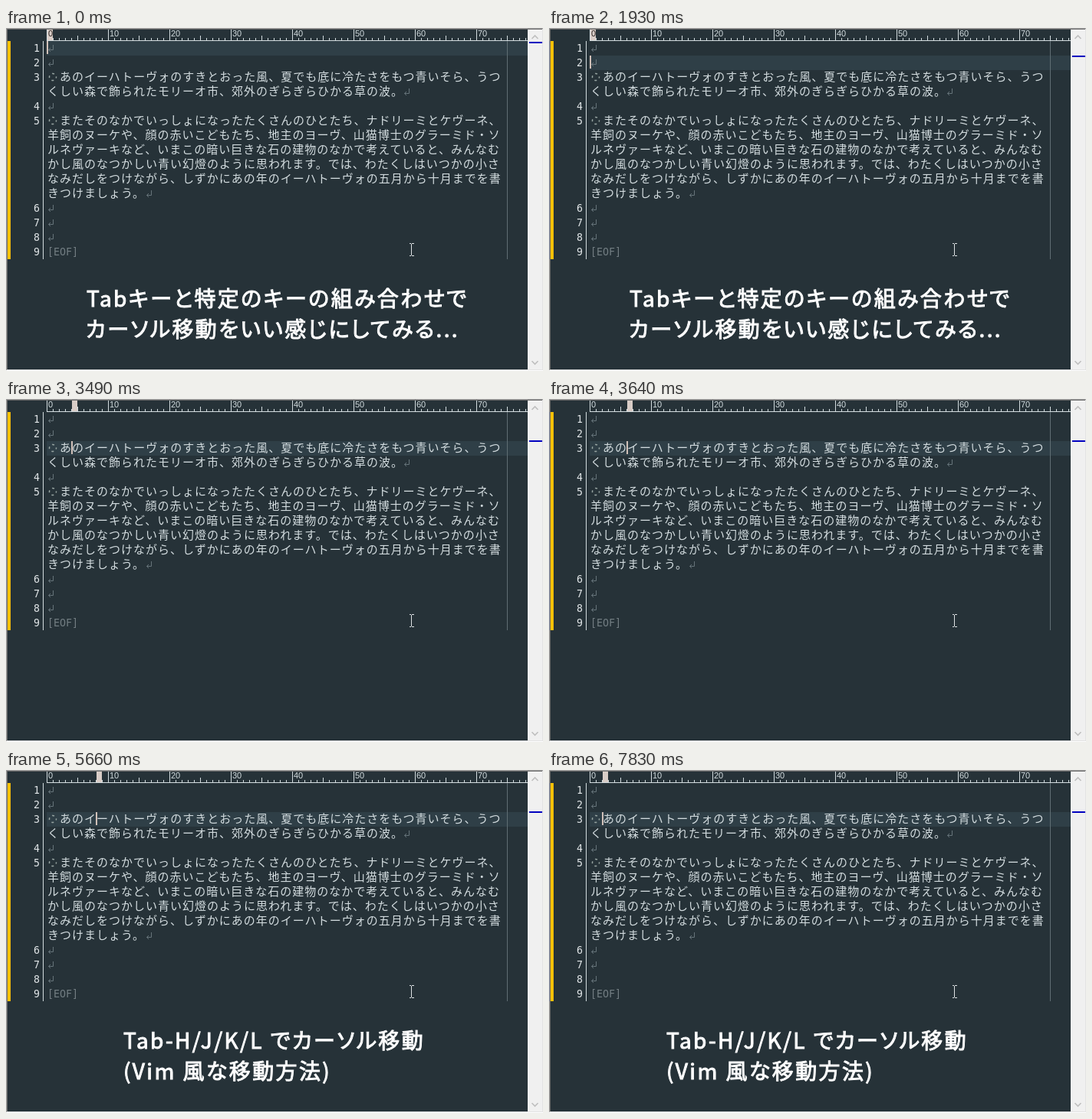
An HTML page that plays this animation: 700x448 px, repeating every 8000 ms.

```html
<!DOCTYPE html>
<html lang="ja">
<head>
<meta charset="utf-8">
<title>カーソル移動</title>
<style>
html, body { margin: 0; width: 100%; height: 100%; overflow: hidden; background: #263238; }
svg { display: block; width: 700px; height: 448px; background: #263238; }
text { white-space: pre; }
.body { font: 15px "Noto Sans CJK JP", "Noto Sans CJK", sans-serif; letter-spacing: 1px; fill: #d3dcdf; }
.mono { font: 13.29px "DejaVu Sans Mono", monospace; fill: #e0e5e7; }
.eof { fill: #727d82; }
.ruler { font: 11px "Liberation Sans", sans-serif; fill: #d3dcdf; }
.ticks { stroke: #d3dcdf; fill: none; }
.sign { stroke: #66747a; fill: none; }
.space { stroke: #98a5a2; stroke-width: 1.5; }
.caption {
  font: 28px "Noto Sans CJK JP", "Noto Sans CJK", sans-serif;
  font-feature-settings: "palt";
  letter-spacing: 2.4px;
  fill: #fff; stroke: #fff; stroke-width: 1px;
}
.invert { fill: #fff; mix-blend-mode: difference; }

/* One 8 s loop; every change is a hard step. */
.timed { animation: 8s step-end infinite; }
#highlight { animation-name: row; --step: 19px; }
#scrollMark { animation-name: row; --step: 18px; }
#marker { animation-name: column; }
#caret { animation-name: caret, blink; }
#intro { animation-name: intro; }
#keys { animation-name: keys; }

@keyframes row {
  0% { transform: none; }
  24.125% { transform: translateY(var(--step)); }
  29.5%, 100% { transform: translateY(calc(2 * var(--step))); }
}
@keyframes column {
  0% { transform: none; }
  40.125% { transform: translateX(16px); }
  43.625% { transform: translateX(32px); }
  45.5% { transform: translateX(48px); }
  70.75% { transform: translateX(64px); }
  72.875% { transform: translateX(80px); }
  87.125% { transform: translateX(64px); }
  90.875% { transform: translateX(48px); }
  92.5% { transform: translateX(32px); }
  97.875%, 100% { transform: translateX(16px); }
}
@keyframes caret {
  0% { transform: none; }
  24.125% { transform: translate(0, 19px); }
  29.5% { transform: translate(0, 38px); }
  40.125% { transform: translate(16px, 38px); }
  43.625% { transform: translate(32px, 38px); }
  45.5% { transform: translate(48px, 38px); }
  70.75% { transform: translate(64px, 38px); }
  72.875% { transform: translate(80px, 38px); }
  87.125% { transform: translate(64px, 38px); }
  90.875% { transform: translate(48px, 38px); }
  92.5% { transform: translate(32px, 38px); }
  97.875%, 100% { transform: translate(16px, 38px); }
}
@keyframes blink {
  0%, 13.5%, 87.125%, 100% { opacity: 1; }
  6.25%, 81.875% { opacity: 0; }
}
@keyframes intro {
  0% { opacity: 1; }
  43.625%, 100% { opacity: 0; }
}
@keyframes keys {
  0% { opacity: 0; }
  58.875%, 100% { opacity: 1; }
}
</style>
</head>
<body>
<svg viewBox="0 0 700 448" shape-rendering="crispEdges">
  <rect id="highlight" class="timed" x="53" y="17" width="628" height="19" fill="#2f3f47"/>
  <rect x="2" y="17" width="4" height="285" fill="#ffc107"/>
  <rect x="48" y="17" width="1" height="285" fill="#d3dcdf"/>
  <rect x="653" y="17" width="1" height="285" fill="#5f6d73"/>

  <g id="ruler"></g>
  <g id="page"></g>

  <rect id="marker" class="timed invert" x="54" y="2" width="7" height="14"/>
  <rect id="caret" class="timed invert" x="53" y="17" width="2" height="17"/>

  <g id="scrollbar">
    <rect x="680" y="2" width="19" height="444" fill="#f0f0f0"/>
    <path d="M685.5 14l4-4 4 4M685.5 435l4 4 4-4" fill="none" stroke="#bfbfbf" stroke-width="1.6" shape-rendering="auto"/>
    <rect id="scrollMark" class="timed" x="682" y="18" width="17" height="2" fill="#0000c0"/>
  </g>

  <path d="M525.5 281.5h2l1 1 1-1h2M528.5 282v14M525.5 297.5h2l1-1 1 1h2" fill="none" stroke="#dfe3e5"/>

  <g id="intro" class="timed caption">
    <text x="105" y="364">Tabキーと特定のキーの組み合わせで</text>
    <text x="104" y="404">カーソル移動をいい感じにしてみる...</text>
  </g>
  <g id="keys" class="timed caption">
    <text x="153" y="364">Tab-H/J/K/L でカーソル移動</text>
    <text x="153" y="404">(Vim 風な移動方法)</text>
  </g>

  <path d="M0 .5h700M.5 0v448" stroke="#a0a0a0"/>
  <path d="M1 1.5h698M1.5 1v445" stroke="#696969"/>
  <path d="M1 446.5h699M699.5 1v446" stroke="#e3e3e3"/>
  <path d="M0 447.5h700" stroke="#fff"/>
</svg>
<script>
const CELL = 8, ROW = 19, LEFT = 54, TOP = 17;

// Each paragraph is a list of wrapped rows; an ideographic space gets a visible sign.
const paragraphs = [
  [''],
  [''],
  ['\u3000あのイーハトーヴォのすきとおった風、夏でも底に冷たさをもつ青いそら、うつ',
   'くしい森で飾られたモリーオ市、郊外のぎらぎらひかる草の波。'],
  [''],
  ['\u3000またそのなかでいっしょになったたくさんのひとたち、ナドリーミとケヴーネ、',
   '羊飼のヌーケや、顔の赤いこどもたち、地主のヨーヴ、山猫博士のグラーミド・ソ',
   'ルネヴァーキなど、いまこの暗い巨きな石の建物のなかで考えていると、みんなむ',
   'かし風のなつかしい青い幻燈のように思われます。では、わたくしはいつかの小さ',
   'なみだしをつけながら、しずかにあの年のイーハトーヴォの五月から十月までを書',
   'きつけましょう。'],
  [''], [''], ['']
];

const label = (x, y, name, str, extra = '') =>
  `<text x="${x}" y="${y}" class="${name}" ${extra}>${str}</text>`;
const lineNumber = (n, y) => label(44, y + 14, 'mono', n, 'text-anchor="end"');
const returnSign = (x, y) =>
  `<path class="sign" d="M${x + 7.5} ${y + 5}v6.5h-6m2.5 -2.5l-2.5 2.5l2.5 2.5" shape-rendering="auto"/>`;
const spaceSign = (x, y) =>
  `<circle class="sign space" cx="${x + 7}" cy="${y + 9}" r="4.5"
    stroke-dasharray="3 4.07" stroke-dashoffset="1.5" shape-rendering="auto"/>`;

function drawPage() {
  let out = '', y = TOP;
  paragraphs.forEach((rows, i) => {
    out += lineNumber(i + 1, y);
    rows.forEach((row, j) => {
      const indent = row.startsWith('\u3000') ? 1 : 0;
      if (indent) out += spaceSign(LEFT, y);
      out += label(LEFT + indent * 2 * CELL, y + 14, 'body', row.slice(indent));
      if (j === rows.length - 1) out += returnSign(LEFT + row.length * 2 * CELL, y);
      y += ROW;
    });
  });
  return out + lineNumber(paragraphs.length + 1, y) + label(LEFT, y + 14, 'mono eof', '[EOF]');
}

function drawRuler() {
  let ticks = 'M53 16.5H680', numbers = '';
  for (let col = 0; col <= 78; col++) {
    const x = 53 + col * CELL;
    const top = col % 10 === 0 ? 2 : col % 5 === 0 ? 10 : 13;
    ticks += `M${x + .5} ${top}V16`;
    if (col % 10 === 0) numbers += label(x + 2, 11, 'ruler', col);
  }
  return `<path class="ticks" d="${ticks}"/>${numbers}`;
}

document.getElementById('page').innerHTML = drawPage();
document.getElementById('ruler').innerHTML = drawRuler();
</script>
</body>
</html>
```
